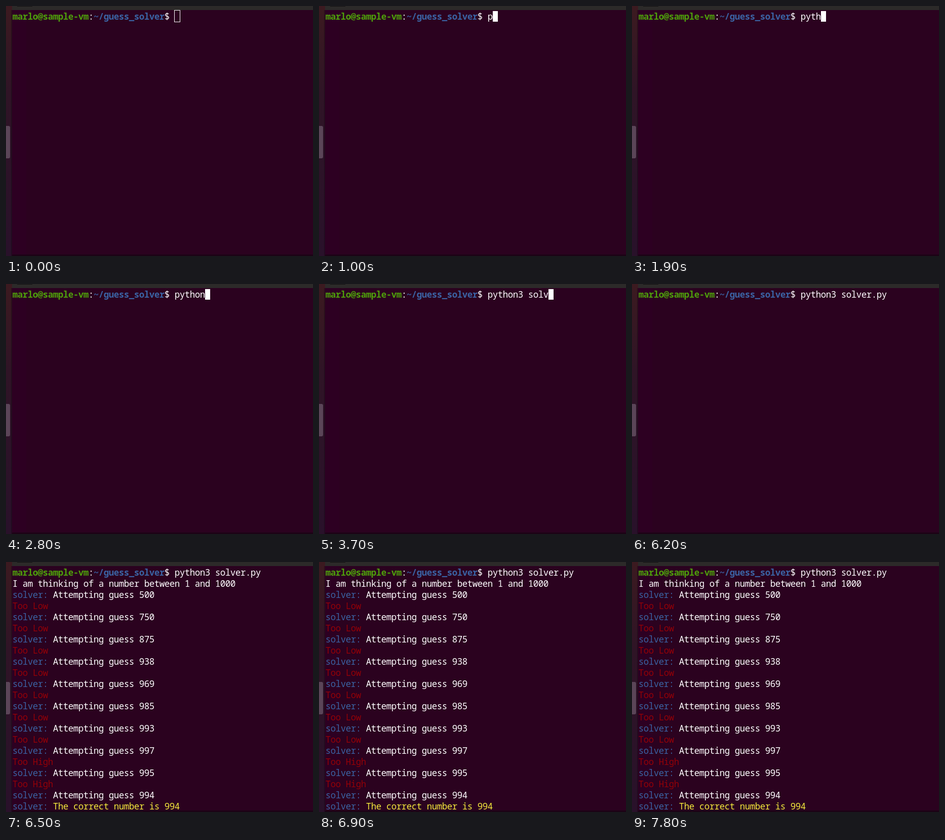
An HTML page with a canvas that plays this animation: 606x494 px, repeating every 8000 ms.

```html
<!DOCTYPE html>
<html lang="en">
<head>
<meta charset="utf-8">
<style>
  html, body { margin: 0; width: 100%; height: 100%; overflow: hidden; background: #2b021f; }
  canvas { display: block; }
</style>
</head>
<body>
<canvas id="stage" width="606" height="494"></canvas>
<script>
const ctx = document.getElementById('stage').getContext('2d');
const LOOP = 8000, CELL = 10, ROW = 22, LEFT = 13;
const GREEN = '#4e9f0b', BLUE = '#3b63a3', WHITE = '#fff', RED = '#920008', YELLOW = '#f3e93c';
const PROMPT = [['marlo@sample-vm', GREEN, 1], [':', WHITE], ['~/guess_solver', BLUE, 1], ['$ ', WHITE]];
const COMMAND = 'python3 solver.py';
const COMMAND_COL = 32;

// [time, characters typed]
const TYPING = [[800, 1], [1500, 2], [1700, 3], [1900, 4], [2100, 5], [2400, 6], [3100, 7], [3300, 9],
  [3500, 10], [3700, 12], [4000, 13], [4200, 14], [4400, 15], [4700, 16], [4900, 17]];
const FOCUS = 300, ENTER = 5200, CURSOR_OFF = 5700, OUTPUT = 6500;

function solve(answer) {
  const lines = [[['I am thinking of a number between 1 and 1000', WHITE]]];
  let low = 1, high = 1000, guess;
  do {
    guess = Math.floor((low + high) / 2);
    lines.push([['solver: ', BLUE], ['Attempting guess ' + guess, WHITE]]);
    if (guess < answer) {
      lines.push([['Too Low', RED]]);
      low = guess + 1;
    } else if (guess > answer) {
      lines.push([['Too High', RED]]);
      high = guess - 1;
    }
  } while (guess !== answer);
  lines.push([['solver: ', BLUE], ['The correct number is ' + answer, YELLOW]]);
  return lines;
}
const RESULT = solve(994);

function rect(x, y, w, h, color) {
  ctx.fillStyle = color;
  ctx.fillRect(x, y, w, h);
}

function write(row, parts, col = 0) {
  for (const [text, color, bold] of parts) {
    ctx.font = (bold ? 'bold ' : '') + '17.5px "Noto Sans Mono", "DejaVu Sans Mono", monospace';
    ctx.letterSpacing = '-0.5px';
    ctx.fillStyle = color;
    ctx.fillText(text, LEFT + col * CELL - 0.25, 27 + row * ROW);
    col += text.length;
  }
}

function cursor(row, col) {
  rect(LEFT + col * CELL, 10 + row * ROW, CELL, ROW - 1, WHITE);
}

function drawWindow() {
  rect(0, 0, 606, 494, '#2b021f');
  rect(12, 8, 28, 486, '#2d0022');
  const desktop = ctx.createLinearGradient(0, 0, 0, 494);
  desktop.addColorStop(0, '#3c1a20');
  desktop.addColorStop(0.35, '#2f1426');
  desktop.addColorStop(1, '#29112a');
  rect(0, 0, 12, 494, desktop);
  rect(10, 8, 2, 486, 'rgba(20,5,18,.4)');
  rect(12, 0, 594, 8, '#2c2a29');
  rect(22, 0, 30, 1, '#121111');
  rect(12, 491, 594, 3, '#1c0316');
  ctx.fillStyle = '#5b4558';
  ctx.beginPath();
  ctx.roundRect(-4, 237, 12, 64, 3);
  ctx.fill();
}

function draw(t) {
  drawWindow();
  const typed = TYPING.reduce((n, [at, count]) => t >= at ? count : n, 0);
  write(0, PROMPT);
  write(0, [[COMMAND.slice(0, typed), WHITE]], COMMAND_COL);

  if (t < FOCUS) {
    ctx.strokeStyle = WHITE;
    ctx.lineWidth = 1;
    ctx.strokeRect(332.5, 8.5, 11, 23);
  } else if (t < ENTER) {
    cursor(0, COMMAND_COL + typed);
  } else if (t < CURSOR_OFF) {
    cursor(1, 0);
  }

  if (t >= OUTPUT) RESULT.forEach((parts, i) => write(i + 1, parts));
}

const start = performance.now();
function tick() {
  draw((performance.now() - start) % LOOP);
  requestAnimationFrame(tick);
}
tick();
</script>
</body>
</html>
```
